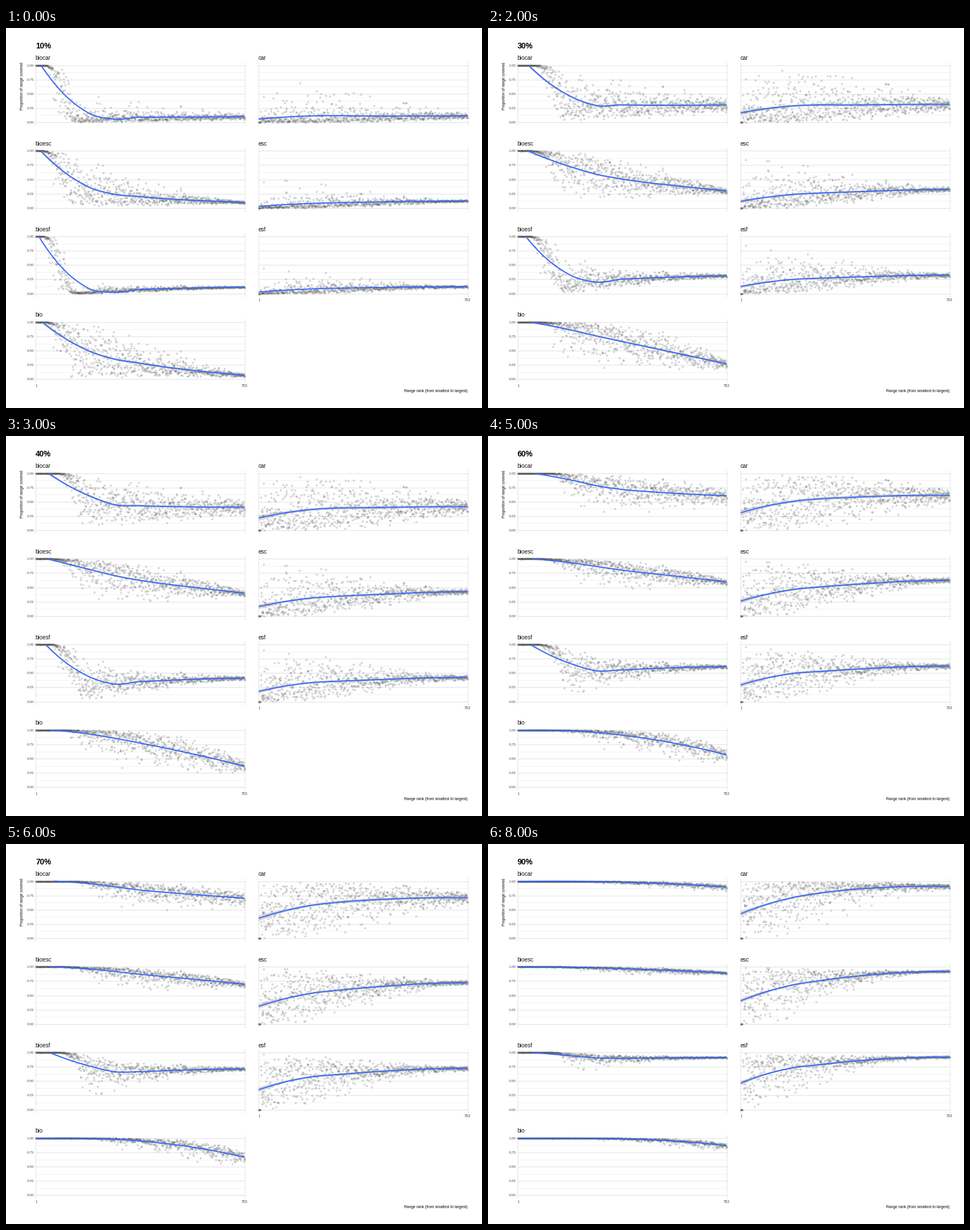
These frames come from a looping animation (837x669 px, 9 s). A matplotlib script:

```python
import numpy as np
import matplotlib.pyplot as plt
from matplotlib.animation import FuncAnimation
from matplotlib.patches import Polygon

W, H, DPI = 837, 669, 72          # at 72 dpi one point is one pixel
N = 763                           # ranked species per panel
LEFT, RIGHT, WIDTH = 52.3, 444.3, 367.3
TOP, STEP, HEIGHT = 65.6, 150.75, 100.4

plt.rcParams["font.family"] = "Liberation Sans"
fig = plt.figure(figsize=(W / DPI, H / DPI), dpi=DPI, facecolor="white")
ax = fig.add_axes([0, 0, 1, 1])
ax.set_xlim(0, W)
ax.set_ylim(H, 0)
ax.axis("off")

rng = np.random.default_rng(763)
rank = np.linspace(0, 1, N)
grid = np.linspace(0, 1, 161)
knots = np.linspace(0, 1, 9)
shared = rng.normal(size=N)


def local_fit(center, span=.75):
    """Weights giving value and slope of a local quadratic at center."""
    d = rank - center
    reach = np.sort(abs(d))[int(span * N) - 1]
    w = np.clip(1 - (abs(d) / reach) ** 3, 0, 1) ** 3
    X = np.c_[np.ones(N), d, d * d]
    return np.linalg.solve(X.T @ (X * w[:, None]), (X * w[:, None]).T)[:2]


FITS = np.array([local_fit(k) for k in knots])
NOISE = np.sqrt((FITS[:, 0] ** 2).sum(axis=1))


def hermite(x, y, slope):
    """Cubic blend between knots from values and slopes."""
    k = np.clip((x * 8).astype(int), 0, 7)
    h = 1 / 8
    s = (x - knots[k]) / h
    return ((1 + 2 * s) * (1 - s) ** 2 * y[k] + s * (1 - s) ** 2 * h * slope[k]
            + s * s * (3 - 2 * s) * y[k + 1] + s * s * (s - 1) * h * slope[k + 1])


def loess(v):
    """Smooth curve through the points and its 95% half width."""
    y, slope = FITS[:, 0] @ v, FITS[:, 1] @ v
    sigma = np.std(v - hermite(rank, y, slope))
    return (hermite(grid, y, slope),
            1.96 * sigma * np.interp(grid, knots, NOISE))


def falling(shift, k, e, edge):
    """Small ranges fully covered, then a drop towards the coverage level."""
    def centre(t):
        gap = (1 - t - shift) * np.maximum(rank, .02) ** (k * t ** e)
        s = np.clip((rank - .02 - edge * t) / (.15 + .1 * t), 0, 1)
        return 1 - gap * s * s * (3 - 2 * s)
    return centre


def rising(shift, start, e, power):
    """Small ranges under-covered, easing up to the coverage level."""
    def centre(t):
        low = start * t ** e
        return low + (t + shift - low) * (1 - (1 - rank) ** power)
    return centre


def label(x, y, text, size, **kw):
    return ax.text(x, y, text, fontsize=size, **kw)


class Panel:
    def __init__(self, name, col, row, centre, spread):
        self.x0 = (LEFT, RIGHT)[col]
        self.y0 = TOP + STEP * row + HEIGHT
        self.col, self.centre = col, centre
        low, high, power = spread
        self.spread = low + high * (1 - rank) ** power
        self.z = np.clip(.75 * shared + .66 * rng.normal(size=N), -2.6, 2.6)
        self.frame(name, col, row)
        self.dots, = ax.plot([], [], "o", ms=3, mew=.6, zorder=3,
                             mfc=(.25, .25, .25, .12), mec=(.25, .25, .25, .27))
        self.band = ax.add_patch(Polygon([(0, 0)], fc="#999999", alpha=.4,
                                         lw=0, zorder=4))
        self.line, = ax.plot([], [], color="#3366ff", lw=1.9, zorder=5,
                             solid_capstyle="butt")

    def px(self, u):
        return self.x0 + WIDTH * u

    def py(self, v):
        return self.y0 - HEIGHT * v

    def frame(self, name, col, row):
        ends = [self.px(0), self.px(1)]
        for i in range(9):
            y = self.py(i / 8)
            major = i % 2 == 0
            ax.plot(ends, [y, y], lw=.8 if major else .5, zorder=1,
                    color="#d9d9d9" if major else "#e4e4e4")
            if major and col == 0:
                label(49.5, y, f"{i / 8:.2f}", 6.4, color="#4d4d4d",
                      ha="right", va="center_baseline")
        for x in ends:
            ax.plot([x, x], [self.py(1.05), self.py(-.05)], lw=.8,
                    color="#dcdcdc", zorder=1)
        label(self.x0 - .5, self.py(1) - 9.5, name, 10, color="#111111")
        if (col, row) in ((0, 3), (1, 2)):
            for u, text in ((0, "1"), (1, "763")):
                label(self.px(u) + 1 - u, self.y0 + 13.6, text, 6.6,
                      color="#4d4d4d", ha="center")

    def values(self, t):
        """Proportion covered per species, logit-normal about the centre."""
        mid = np.clip(self.centre(t), .004, .9985)
        logit = np.log(mid / (1 - mid)) * np.sqrt(1 + .39 * self.spread ** 2)
        v = 1 / (1 + np.exp(-logit - self.spread * self.z))
        if self.col == 1:
            v[rank < .009] = 0
        return v

    def show(self, t):
        points = self.values(t)
        self.dots.set_data(self.px(rank), self.py(points))
        v, half = loess(points)
        ok = v <= 1.002
        x, v, half = self.px(grid[ok]), v[ok], half[ok]
        self.line.set_data(x, self.py(v))
        edge = np.r_[np.minimum(v + half, 1), (v - half)[::-1]]
        self.band.set_xy(np.c_[np.r_[x, x[::-1]], self.py(edge)])


panels = [
    Panel("biocar", 0, 0, falling(-.005, 4, 3.8, .2), (.25, .95, 1)),
    Panel("car", 1, 0, rising(.01, .5, .7, 2.7), (.25, 1.5, 1.2)),
    Panel("bioesc", 0, 1, falling(-.005, 1.9, 1, .1), (.1, 1.1, 1)),
    Panel("esc", 1, 1, rising(.02, .5, 1.1, 2.2), (.1, 1.6, 1.8)),
    Panel("bioesf", 0, 2, falling(.015, -.2, .5, .13), (.08, 1.2, 2)),
    Panel("esf", 1, 2, rising(.02, .6, 1.15, 2.2), (.09, 1.5, 1.9)),
    Panel("bio", 0, 3, falling(-.035, 3.7, 1, .17), (.2, 1.3, 1)),
]

title = label(52, 36, "", 13.6, weight="bold", color="black")
label(28.7, 102.5, "Proportion of range covered", 6.7, rotation=90,
      ha="center", va="center")
label(812, 641.3, "Range rank (from smallest to largest)", 6.7, ha="right")


def update(i):
    title.set_text(f"{10 * (i + 1)}%")
    for panel in panels:
        panel.show((i + 1) / 10)
    return []


anim = FuncAnimation(fig, update, frames=9, interval=1000, repeat=True)
plt.show()
```
